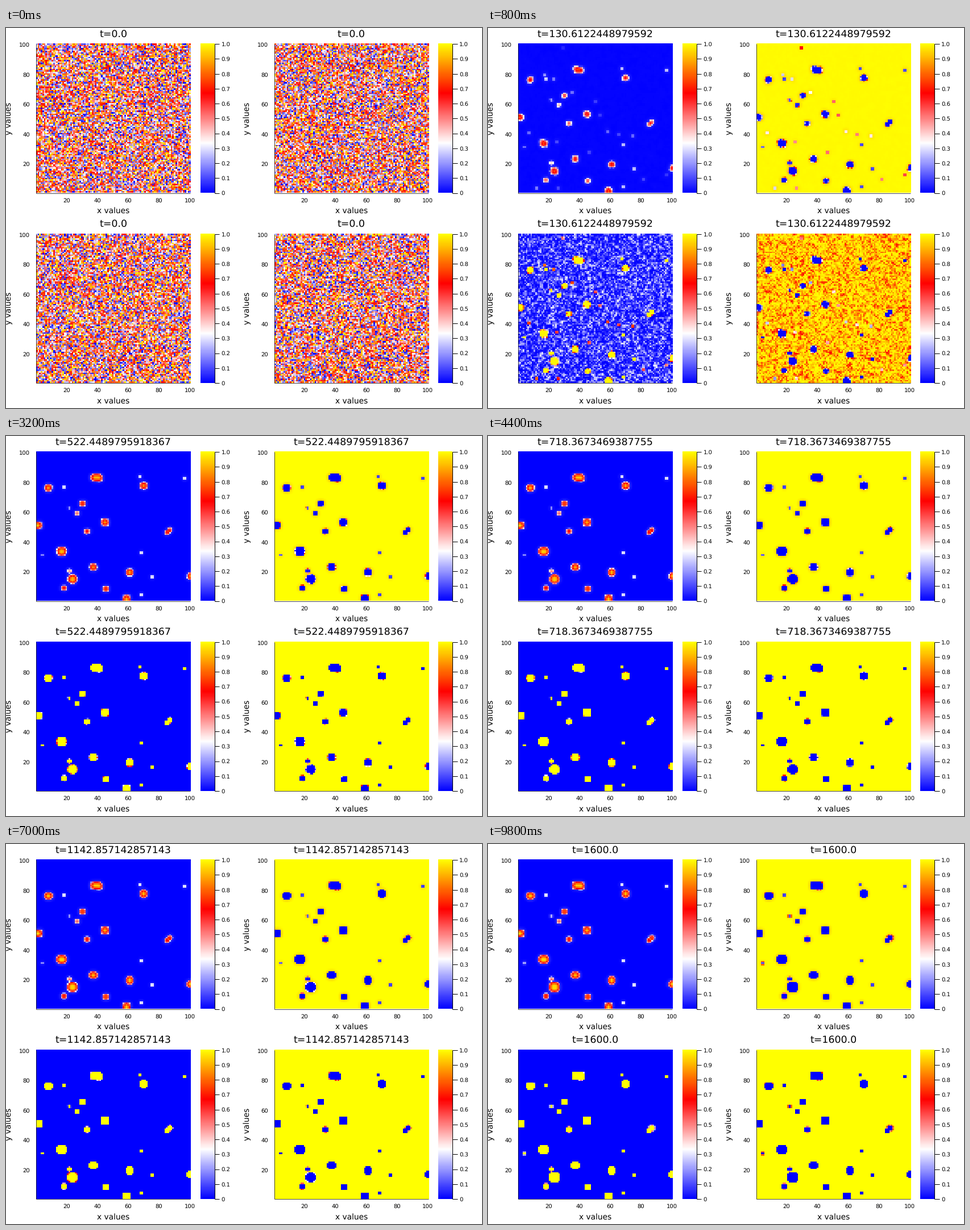
Animation, 837 px wide and 669 px high, one loop 10000 ms. Source, as a matplotlib script:

```python
import numpy as np
import matplotlib.pyplot as plt
from matplotlib.animation import FuncAnimation
from matplotlib.colors import LinearSegmentedColormap

W, H, DPI = 837, 669, 64
FRAMES, STEP = 50, 200
N = 100
T_END = 1600
PANEL = (53.3, 28.1, 271.2, 262.4)  # left, top, width, height
BAR = (342, 25)  # left, width
SHIFT = (W / 2, H / 2)

plt.rcParams["font.family"] = "DejaVu Sans"
plt.rcParams["text.hinting"] = "no_hinting"
CMAP = LinearSegmentedColormap.from_list("heat", ["blue", "white", "red", "yellow"], N=512)

# spot centres by radius; touching spots merge
SPOTS = {
    1: [(18.5, 76.5), (67.5, 83.5), (96.5, 82.5), (68.5, 32.5),
        (75.5, 16.5), (68.5, 4.5), (4.5, 31), (22, 62.5)],
    1.5: [(27, 59), (85, 46), (22, 20.5)],
    2: [(30.5, 65.5), (33.5, 47), (45.5, 8.5), (87, 48), (18.5, 9)],
    2.6: [(45, 53), (2, 51), (37.5, 23), (59, 2), (100.5, 17), (8.5, 76.2),
          (38.3, 83), (41, 82.6), (70, 77.5), (61, 19.5)],
    3.2: [(17, 33.5), (24, 15)],
}

rng = np.random.default_rng(7)
NOISE = rng.random((4, N, N))
ROUGH = rng.random((N, N)) - 0.5
FADING = np.column_stack([rng.integers(2, N, (18, 2)) + 0.5, rng.uniform(140, 380, 18)])
Y, X = np.mgrid[1:N + 1, 1:N + 1]


def box(a):
    """Mean over each cell's 3 x 3 neighbourhood."""
    p = np.pad(a, 1, mode="edge")
    return sum(p[i:i + N, j:j + N] for i in range(3) for j in range(3)) / 9


SMOOTH = [box(a) for a in NOISE]


def spot_mask(t):
    """Rough round spots that grow and turn square."""
    early = np.exp(-t / 260)
    power = 2.3 + 2 * t / T_END
    rough, soft = 0.4 * early, 0.04 + 0.25 * early

    def spot(x, y, r):
        d = (np.abs(X - x) ** power + np.abs(Y - y) ** power) ** (1 / power) / r
        return np.clip((1 + rough * ROUGH - d) / soft + 0.5, 0, 1)

    mask = np.zeros((N, N))
    for r, centres in SPOTS.items():
        size = r - 0.3 * early * (r - 1)
        for x, y in centres:
            mask = np.maximum(mask, spot(x, y, size))
    for x, y, life in FADING:
        if t < life:
            mask = np.maximum(mask, np.sqrt(1 - t / life) * spot(x, y, 1))
    return mask


def spread_noise(a, smooth, t):
    """Noise that diffuses quickly while it fades."""
    raw = np.exp(-t / 30)
    return (raw * a + (1 - raw) * smooth) * np.exp(-t / 30)


def still_noise(a, smooth, t):
    """Noise that stays grainy and fades late."""
    age = min(t / 130, 1)
    mix = 0.35 * age
    grain = (1 - mix) * a + mix * smooth
    return (1 + 0.3 * age) * grain ** (1 + 1.7 * age) * np.exp(-(t / 125) ** 2)


def fields(t):
    m = spot_mask(t)
    grow = 1 - np.exp(-t / 30)
    g = m * grow
    b = box(box(m))
    level = 0.95 - 0.25 * np.exp(-t / 250)
    dome = level * b * (m + 0.15 * (1 - m))
    well = (1 - m) * (1 - 0.15 * b) + m * 0.3 * np.clip(0.6 - b, 0, 1)
    u = spread_noise(NOISE[0], SMOOTH[0], t) * (1 - g) + dome * grow
    v = (1 - spread_noise(1 - NOISE[1], 1 - SMOOTH[1], t)) * (1 - grow + grow * well)
    p = still_noise(NOISE[2], SMOOTH[2], t) * (1 - g) + g
    q = (1 - still_noise(1 - NOISE[3], 1 - SMOOTH[3], t)) * (1 - g)
    return u, v, p, q


fig = plt.figure(figsize=(W / DPI, H / DPI), dpi=DPI, facecolor="white")
ax = fig.add_axes([0, 0, 1, 1])
ax.axis("off")


def label(x, y, s, px, ha="center", va="baseline", **kw):
    return ax.text(x, y, s, fontsize=px * 72 / DPI, color="black", ha=ha, va=va, **kw)


def line(x, y, px=1):
    ax.plot(x, y, color="black", lw=px * 72 / DPI, solid_capstyle="butt", zorder=3)


def draw_image(data, x, y, w, h):
    return ax.imshow(data, cmap=CMAP, vmin=0, vmax=1, origin="lower", aspect="auto",
                     interpolation="nearest", extent=(x, x + w, y + h, y), zorder=2)


def make_panel(dx, dy, data):
    x, y, w, h = PANEL
    x, y = x + dx, y + dy
    image = draw_image(data, x, y, w, h)
    line([x, x], [y, y + h], 0.7)
    line([x, x + w], [y + h, y + h], 0.7)
    for n in range(20, 101, 20):
        f = (n - 0.5) / N
        label(x + f * w, dy + 306.7, str(n), 9.96)
        label(dx + 42.4, y + (1 - f) * h, str(n), 9.96, "right", "center_baseline")
    label(x + w / 2, dy + 325.8, "x values", 13.7)
    label(dx + 9.3, y + h / 2, "y values", 13.7, rotation=90, rotation_mode="anchor")

    left, right = dx + BAR[0], dx + sum(BAR)
    draw_image(np.linspace(0, 1, 256)[:, None], left, y, BAR[1], h)
    line([right, right], [y, y + h])
    for n in range(11):
        ty = y + h * (1 - n / 10)
        line([right, right + 8.5], [ty, ty])
        label(right + 11.5, ty, f"{n / 10:.1f}" if n else "0", 9.96, "left", "center_baseline")
    return image, label(x + w / 2, dy + 15.3, "", 17.4)


corners = [(cx * SHIFT[0], cy * SHIFT[1]) for cy in (0, 1) for cx in (0, 1)]
panels = [make_panel(dx, dy, f) for (dx, dy), f in zip(corners, fields(0))]
ax.set_xlim(0, W)
ax.set_ylim(H, 0)


def update(i):
    t = T_END * i / (FRAMES - 1)
    for (image, title), f in zip(panels, fields(t)):
        image.set_data(f)
        title.set_text(f"t={t!r}")
    return [artist for pair in panels for artist in pair]


anim = FuncAnimation(fig, update, frames=FRAMES, interval=STEP, repeat=True, repeat_delay=0)
plt.show()
```
